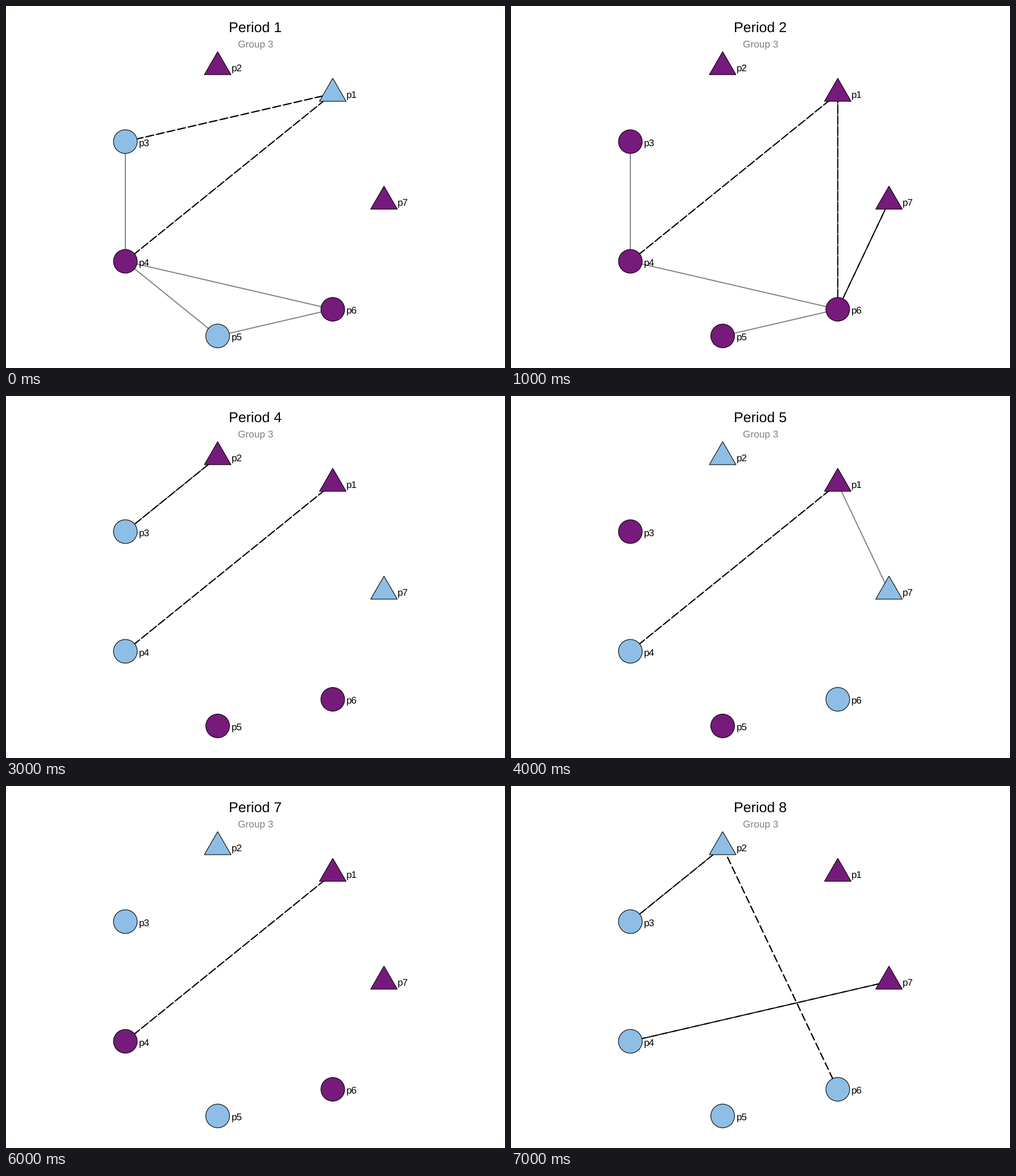
These frames come from a looping animation (878x638 px, 8000 ms). A matplotlib script:

```python
import numpy as np
import matplotlib.pyplot as plt
from matplotlib.animation import FuncAnimation
from matplotlib.patches import Circle, RegularPolygon

W, H = 878, 638
PURPLE, BLUE, GREY = "#761a7c", "#8ebee5", "#808080"
LINE = 1.9
DASH = (0, (13.9 / LINE, 5.2 / LINE))
TRIANGLES = {1, 2, 7}

# Per period: the blue nodes, then the links as pairs of node numbers.
PERIODS = [
    ("135", "13 14 34 45 46 56"),
    ("", "14 16 34 46 56 67"),
    ("2356", "13 25 35 36 37 45"),
    ("347", "14 23"),
    ("2467", "14 17"),
    ("234", "13 14 15 16 27 37"),
    ("235", "14"),
    ("23456", "23 26 47"),
]

plt.rcParams["font.family"] = "Liberation Sans"
plt.rcParams["text.hinting"] = "none"

fig = plt.figure(figsize=(W / 72, H / 72), dpi=72, facecolor="white")
ax = fig.add_axes([0, 0, 1, 1])
ax.set_xlim(0, W)
ax.set_ylim(H, 0)
ax.axis("off")


def place(n):
    angle = 2 * np.pi * n / 7
    return 425.7 + 239.4 * np.cos(angle), 344.5 - 243.1 * np.sin(angle)


def make_node(n):
    x, y = place(n)
    style = dict(edgecolor="black", linewidth=1.1, zorder=3)
    if n in TRIANGLES:
        # The y axis points down, so turn the triangle upright.
        shape = RegularPolygon((x, y), 3, radius=27.1, orientation=np.pi, **style)
    else:
        shape = Circle((x, y), 20.9, **style)
    ax.text(x + 24.2, y + 8, f"p{n}", fontsize=17, va="baseline", zorder=4)
    return ax.add_patch(shape)


def draw_link(a, b):
    (x0, y0), (x1, y1) = place(a), place(b)
    if (a in TRIANGLES) == (b in TRIANGLES):
        return ax.plot([x0, x1], [y0, y1], color=GREY, lw=LINE, zorder=1)
    # Dashes run from both ends, so their gaps partly fill each other.
    style = dict(color="black", lw=LINE, ls=DASH, dash_capstyle="butt", zorder=2)
    return (ax.plot([x0, x1], [y0, y1], **style)
            + ax.plot([x1, x0], [y1, y0], **style))


title = ax.text(W / 2 - 46.5, 46, "", fontsize=25, va="baseline")
ax.text(W / 2, 73, "Group 3", fontsize=17.2, color=GREY, ha="center", va="baseline")
nodes = {n: make_node(n) for n in range(1, 8)}
links = []


def update(i):
    blue, pairs = PERIODS[i]
    title.set_text(f"Period {i + 1}")
    for n, node in nodes.items():
        node.set_facecolor(BLUE if str(n) in blue else PURPLE)
    while links:
        links.pop().remove()
    for a, b in pairs.split():
        links.extend(draw_link(int(a), int(b)))
    return [title, *nodes.values(), *links]


anim = FuncAnimation(fig, update, frames=len(PERIODS), interval=1000,
                     init_func=lambda: update(0), repeat=True, repeat_delay=0)
plt.show()
```
